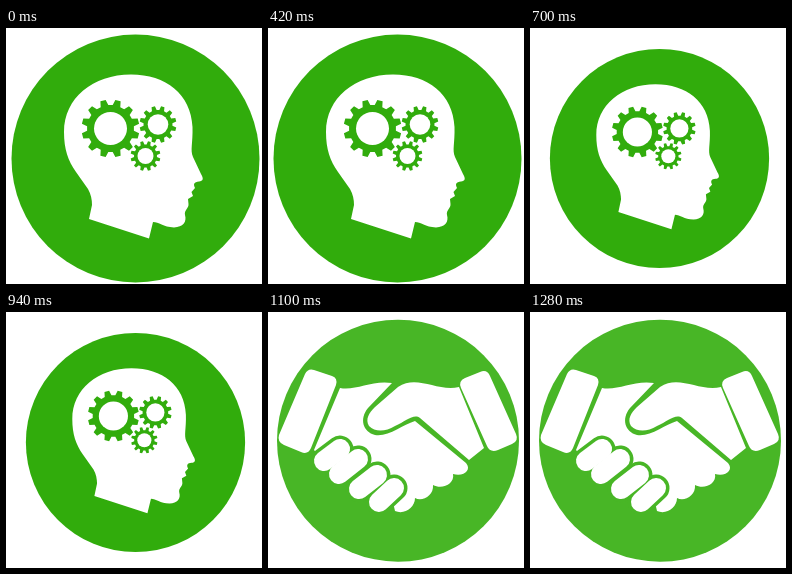
An HTML page for the animation above (1.4 s loop, 256 px wide and 256 px high).

```html
<!DOCTYPE html>
<html lang="en">
<head>
<meta charset="utf-8">
<style>
  html, body { margin: 0; height: 100%; overflow: hidden; background: #fff; }
  svg { display: block; width: 100vw; height: 100vh; }
  #idea { fill: #31ac0c; }
  #deal { fill: #48b626; }
  .white { fill: #fff; }
  .finger { fill: none; stroke-linecap: round; }
</style>
</head>
<body>
<svg viewBox="0 0 256 256">
  <g id="idea">
    <circle cx="129.5" cy="130.5" r="124"/>
    <path class="white" d="M125 46.5C87 46.5 58 70 58 104C58 121 62 133 70 144L82 161C85 166 86 172 86 177
      L83 191L143 210.5L147 194C153 194 157 199 168 199.5C177 199 181 194 179 187
      C178 182 183 180 182.5 176L182 171L187 168L185.5 164L189 160C187 156 188 154 193 153.5
      C197 153 198 151 195 146L187 129C184 122 187 115 186.5 99C185 66 160 46.5 125 46.5Z"/>
    <g id="gears"></g>
  </g>
  <g id="deal">
    <circle cx="130" cy="128.7" r="121"/>
    <g class="white">
      <path d="M46 58L64 64Q70 66 68 73L43 136Q40 143 33 140L16 133Q9 130 11 123L37 62Q40 56 46 58Z"/>
      <path d="M197 66L212 60Q219 57 222 64L248 122Q251 129 244 132L230 138Q222 141 219 134L193 76Q190 69 197 66Z"/>
      <path d="M72 76C88 79 103 68 124 71L100 96C91 107 95 120 107 123C121 125 134 113 147 109
        L198 151C204 158 196 165 185 162C187 172 174 178 165 173C166 184 154 190 147 186
        C147 196 136 203 127 199L118 160L52 145L46 138Z"/>
      <path d="M130 75C149 62 169 80 191 75L216 136L201 148L152 106C146 101 138 109 127 114
        C117 120 107 120 101 114C97 107 101 101 107 95Z"/>
    </g>
    <g id="fingers"></g>
  </g>
</svg>
<script>
  const byId = id => document.getElementById(id);

  function gear(x, y, outer, root, hole) {
    const teeth = 12;
    const points = [];
    for (let i = 0; i < teeth; i++) {
      for (const [offset, r] of [[.18, root], [.32, outer], [.68, outer], [.82, root]]) {
        const a = (i + offset) * 2 * Math.PI / teeth;
        points.push(`${x + r * Math.cos(a)} ${y + r * Math.sin(a)}`);
      }
    }
    return `<path d="M${points.join('L')}Z"/><circle class="white" cx="${x}" cy="${y}" r="${hole}"/>`;
  }

  byId('gears').innerHTML =
    gear(104.5, 100.5, 29, 23.5, 16.5) +
    gear(152, 96.5, 18.5, 14.5, 10.3) +
    gear(139.5, 128, 15, 11.5, 8);

  const fingers = ['M56 149L72 137', 'M71 162L90 147', 'M91 177L109 163', 'M111 190L126 176'];
  const strokes = (color, width) => fingers.map(d =>
    `<path class="finger" d="${d}" stroke="${color}" stroke-width="${width}"/>`).join('');
  byId('fingers').innerHTML = strokes('#48b626', 27) + strokes('#fff', 20);

  function draw(now) {
    const t = now % 1400;
    const scale = t < 700 ? 1 : .884;
    byId('idea').setAttribute('transform',
      `translate(129.5 130.5) scale(${scale}) translate(-129.5 -130.5)`);
    byId('idea').style.display = t < 1100 ? '' : 'none';
    byId('deal').style.display = t < 1100 ? 'none' : '';
    requestAnimationFrame(draw);
  }
  draw(0);
</script>
</body>
</html>
```
